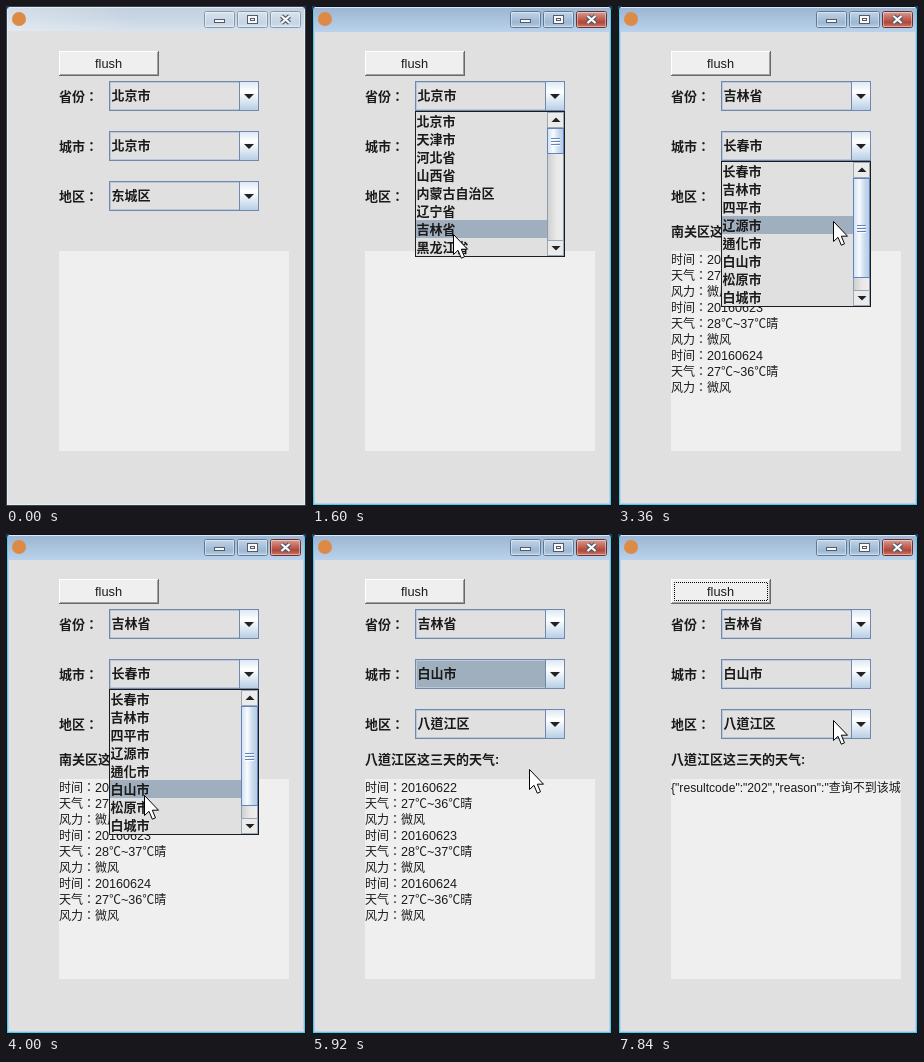
Animation of 300x500 px, one loop 8 s. Source, as an HTML page with a canvas:

```html
<!DOCTYPE html>
<html lang="zh-TW">
<head>
<meta charset="utf-8">
<style>
html, body { margin: 0; width: 100%; height: 100%; overflow: hidden; background: #e0e0e0; }
canvas { display: block; }
</style>
</head>
<body>
<canvas id="stage" width="300" height="500"></canvas>
<script>
const ctx = document.getElementById('stage').getContext('2d');
const LOOP = 8000, TICK = 160;
const PANEL = '#e0e0e0', PALE = '#efefef', SELECTED = '#a0afbe', EDGE = '#7187ab';
const CJK = '"Noto Sans CJK TC", "Noto Sans CJK SC", "Noto Sans CJK", sans-serif';
const LATIN = '"Liberation Sans", sans-serif';

const PROVINCES = ['北京市', '天津市', '河北省', '山西省', '内蒙古自治区', '辽宁省', '吉林省', '黑龙江省'];
const CITIES = ['长春市', '吉林市', '四平市', '辽源市', '通化市', '白山市', '松原市', '白城市'];
const FORECAST = [['20160622', '27℃~36℃晴'], ['20160623', '28℃~37℃晴'], ['20160624', '27℃~36℃晴']]
  .flatMap(([day, sky]) => ['时间：' + day, '天气：' + sky, '风力：微风']);
const FAILURE = ['{"resultcode":"202","reason":"查询不到该城市的信息"'];

// Pointer waypoints: time, x, y
const PATH = [
  [320, 250, 98], [800, 250, 98], [960, 240, 117], [1120, 212, 154], [1280, 175, 198],
  [1440, 146, 232], [1600, 141, 228], [1920, 137, 226], [2080, 137, 226], [2240, 200, 184],
  [2400, 254, 147], [2720, 248, 150], [3040, 243, 151], [3200, 243, 151], [3360, 215, 215],
  [3520, 193, 242], [3680, 165, 260], [3840, 146, 266], [4000, 138, 261], [4800, 138, 261],
  [4960, 185, 255], [5120, 215, 244], [5280, 231, 231], [5440, 229, 225], [5920, 217, 235],
  [6080, 196, 190], [6240, 164, 126], [6400, 130, 78], [6560, 116, 60], [7680, 116, 60], [7840, 215, 186]
];

function pointerAt(t) {
  if (t < PATH[0][0]) return null;
  const next = PATH.findIndex(p => p[0] > t);
  if (next < 0) return PATH[PATH.length - 1].slice(1);
  const [t0, x0, y0] = PATH[next - 1], [t1, x1, y1] = PATH[next];
  const k = (t - t0) / (t1 - t0);
  return [Math.round(x0 + (x1 - x0) * k), Math.round(y0 + (y1 - y0) * k)];
}

function rect(x, y, w, h, fill) {
  ctx.fillStyle = fill;
  ctx.fillRect(x, y, w, h);
}

function frame(x, y, w, h, color) {
  ctx.strokeStyle = color;
  ctx.strokeRect(x + .5, y + .5, w - 1, h - 1);
}

function gradient(x0, y0, x1, y1, ...colors) {
  const g = ctx.createLinearGradient(x0, y0, x1, y1);
  colors.forEach((c, i) => g.addColorStop(i / (colors.length - 1), c));
  return g;
}

function polygon(points, fill) {
  ctx.beginPath();
  points.forEach(([x, y]) => ctx.lineTo(x, y));
  ctx.closePath();
  ctx.fillStyle = fill;
  ctx.fill();
}

function text(str, x, baseline, { bold = false, size = bold ? 13 : 12, latin = 12.6, color = '#1a1a1a' } = {}) {
  ctx.fillStyle = color;
  for (const run of str.match(/[ -~]+|[^ -~]+/g)) {
    const isLatin = /^[ -~]/.test(run);
    ctx.font = `${bold ? 'bold ' : ''}${isLatin ? latin + 'px ' + LATIN : size + 'px ' + CJK}`;
    ctx.fillText(run, x, baseline);
    x += ctx.measureText(run).width;
  }
}

function titleButton(x, kind, active) {
  const red = active && kind === 'close';
  const colors = red ? ['#dfa79d', '#c77265', '#b0473a', '#cf8173']
    : active ? ['#c4d6e8', '#b0c7de', '#9db7d2', '#b9d0e5'] : ['#dae5f0', '#cfdce9', '#c5d4e3', '#d5e2ee'];
  ctx.beginPath();
  ctx.roundRect(x + .5, 5.5, 30, 16, 2);
  ctx.fillStyle = gradient(0, 5, 0, 22, ...colors);
  ctx.fill();
  ctx.strokeStyle = red ? '#64333a' : active ? '#607791' : '#8796a8';
  ctx.stroke();
  frame(x + 1, 6, 29, 15, 'rgba(255,255,255,.4)');
  const ink = '#535b6b';
  if (kind === 'min') {
    rect(x + 10, 13, 11, 4, '#f8f8f8');
    frame(x + 10, 13, 11, 4, ink);
  } else if (kind === 'max') {
    rect(x + 10, 9, 11, 9, '#f8f8f8');
    frame(x + 10, 9, 11, 9, ink);
    frame(x + 13, 12, 5, 3, ink);
  } else {
    for (const [width, color] of [[4.5, ink], [2.3, '#fafafa']]) {
      ctx.beginPath();
      ctx.moveTo(x + 11.5, 10); ctx.lineTo(x + 19.5, 17);
      ctx.moveTo(x + 19.5, 10); ctx.lineTo(x + 11.5, 17);
      ctx.lineWidth = width;
      ctx.strokeStyle = color;
      ctx.stroke();
    }
    ctx.lineWidth = 1;
  }
}

function drawWindow(active) {
  rect(0, 0, 300, 500, PANEL);
  const bar = active ? ['#99b4d1', '#a9c2dd', '#b9d1ea'] : ['#c1cedb', '#c9d6e3', '#d6e2ed'];
  rect(0, 0, 300, 25, gradient(0, 0, 0, 25, ...bar));
  if (active) frame(2, 25, 296, 473, '#b9d1ea');
  else rect(0, 0, 130, 25, gradient(0, 0, 130, 0, 'rgba(255,255,255,.3)', 'rgba(255,255,255,0)'));
  frame(1, 1, 298, 498, active ? '#48cdf0' : '#e5edf4');
  if (active) rect(1, 1, 298, 1, '#dcebf7');
  frame(0, 0, 300, 500, active ? '#0c1218' : '#3c4450');
  polygon([[0, 0], [4, 0], [0, 4]], '#1b4268');
  polygon([[300, 0], [296, 0], [300, 4]], '#1b4268');
  ctx.beginPath();
  ctx.arc(13, 13, 7, 0, 7);
  ctx.fillStyle = '#dc8a46';
  ctx.fill();
  titleButton(198, 'min', active);
  titleButton(231, 'max', active);
  titleButton(264, 'close', active);
}

function drawFlush(focused) {
  rect(53, 45, 100, 25, '#696969');
  rect(53, 45, 99, 24, '#ffffff');
  rect(54, 46, 98, 23, '#a0a0a0');
  rect(54, 46, 97, 22, PALE);
  text('flush', 89, 62, { latin: 12.8 });
  if (focused) {
    ctx.setLineDash([1, 1]);
    ctx.lineDashOffset = .5;
    frame(56, 48, 94, 19, '#000');
    ctx.setLineDash([]);
  }
}

function metal(x, y, w, h) {
  rect(x, y, w, h, gradient(x, y, x, y + h, '#dde8f3', '#ffffff', '#dde8f3', '#b8cfe5'));
}

function combo(y, label, value, focused) {
  text(label + '：', 53, y + 19.5, { bold: true });
  rect(103, y, 150, 30, PANEL);
  frame(104, y + 1, 148, 28, '#b8c8da');
  if (focused) rect(105, y + 2, 128, 26, SELECTED);
  metal(233, y + 1, 19, 28);
  frame(233, y, 20, 30, EDGE);
  frame(103, y, 150, 30, EDGE);
  polygon([[238, y + 13], [248, y + 13], [243, y + 18]], '#222');
  text(value, 105.5, y + 19, { bold: true });
}

function scrollBar(y, thumbHeight) {
  rect(236, y, 16, 144, gradient(236, 0, 252, 0, '#d0d0d0', '#e8e8e8', '#eeeeee'));
  frame(235, y, 17, 144, '#8d9bae');
  for (const [top, dir] of [[y, -1], [y + 128, 1]]) {
    rect(236, top, 16, 16, '#ebebeb');
    frame(235, top, 17, 16, '#9ba7b5');
    const mid = top + 8;
    polygon([[239.5, mid - 2 * dir], [248.5, mid - 2 * dir], [244, mid + 2.5 * dir]], '#222');
  }
  const top = y + 16;
  rect(236, top, 16, thumbHeight, gradient(236, 0, 252, 0, '#d4e2f0', '#f8fbfe', '#c9dbec', '#b2cae3'));
  frame(235, top, 17, thumbHeight, '#6382bf');
  const mid = top + Math.floor(thumbHeight / 2);
  for (const dy of [-3, 0, 3]) {
    rect(239, mid + dy, 9, 1, '#6382bf');
    rect(239, mid + dy + 1, 9, 1, '#ffffff');
  }
}

function popup(y, items, pointerY, thumbHeight) {
  rect(103, y, 150, 146, PANEL);
  const chosen = Math.max(0, Math.min(7, Math.floor((pointerY - y - 1) / 18)));
  rect(104, y + 1 + chosen * 18, 132, 18, SELECTED);
  items.forEach((item, i) => text(item, 104.5, y + 15 + i * 18, { bold: true }));
  scrollBar(y + 1, thumbHeight);
  frame(103, y, 150, 146, '#1c1c1c');
}

function report(lines, latin) {
  ctx.save();
  ctx.beginPath();
  ctx.rect(53, 245, 230, 200);
  ctx.clip();
  lines.forEach((line, i) => text(line, 53, 258 + i * 16, { latin }));
  ctx.restore();
}

function drawPointer([x, y]) {
  const shape = [[.5, .5], [.5, 20.5], [5, 16.3], [8.3, 24.2], [11.5, 22.8], [8.3, 15.2], [14.5, 15.2]];
  polygon(shape.map(([dx, dy]) => [x + dx, y + dy]), '#fff');
  ctx.strokeStyle = '#000';
  ctx.stroke();
}

function draw(t) {
  const pointer = pointerAt(t);
  const between = (from, to) => t >= from && t < to;
  const loaded = t >= 2240, cityPicked = t >= 4320, districtLoaded = t >= 4480;
  const district = districtLoaded ? '八道江区' : loaded ? '南关区' : '东城区';

  drawWindow(t >= 320);
  drawFlush(t >= 6560);
  combo(75, '省份', loaded ? '吉林省' : '北京市', between(2240, 3040));
  combo(125, '城市', cityPicked ? '白山市' : loaded ? '长春市' : '北京市', between(4320, 6560));
  combo(175, '地区', district, false);
  rect(53, 245, 230, 200, PALE);
  if (loaded) {
    text(district + '这三天的天气:', 53, 230, { bold: true });
    if (t < 7200) report(FORECAST, 12.6);
    else report(FAILURE, 12.15);
  }
  if (between(480, 2240)) popup(105, PROVINCES, pointer[1], 26);
  if (between(3040, 4320)) popup(155, CITIES, pointer[1], 100);
  if (pointer) drawPointer(pointer);
}

const start = performance.now();
function tick() {
  const t = (performance.now() - start) % LOOP;
  draw(Math.floor(t / TICK) * TICK);
  requestAnimationFrame(tick);
}
tick();
</script>
</body>
</html>
```
